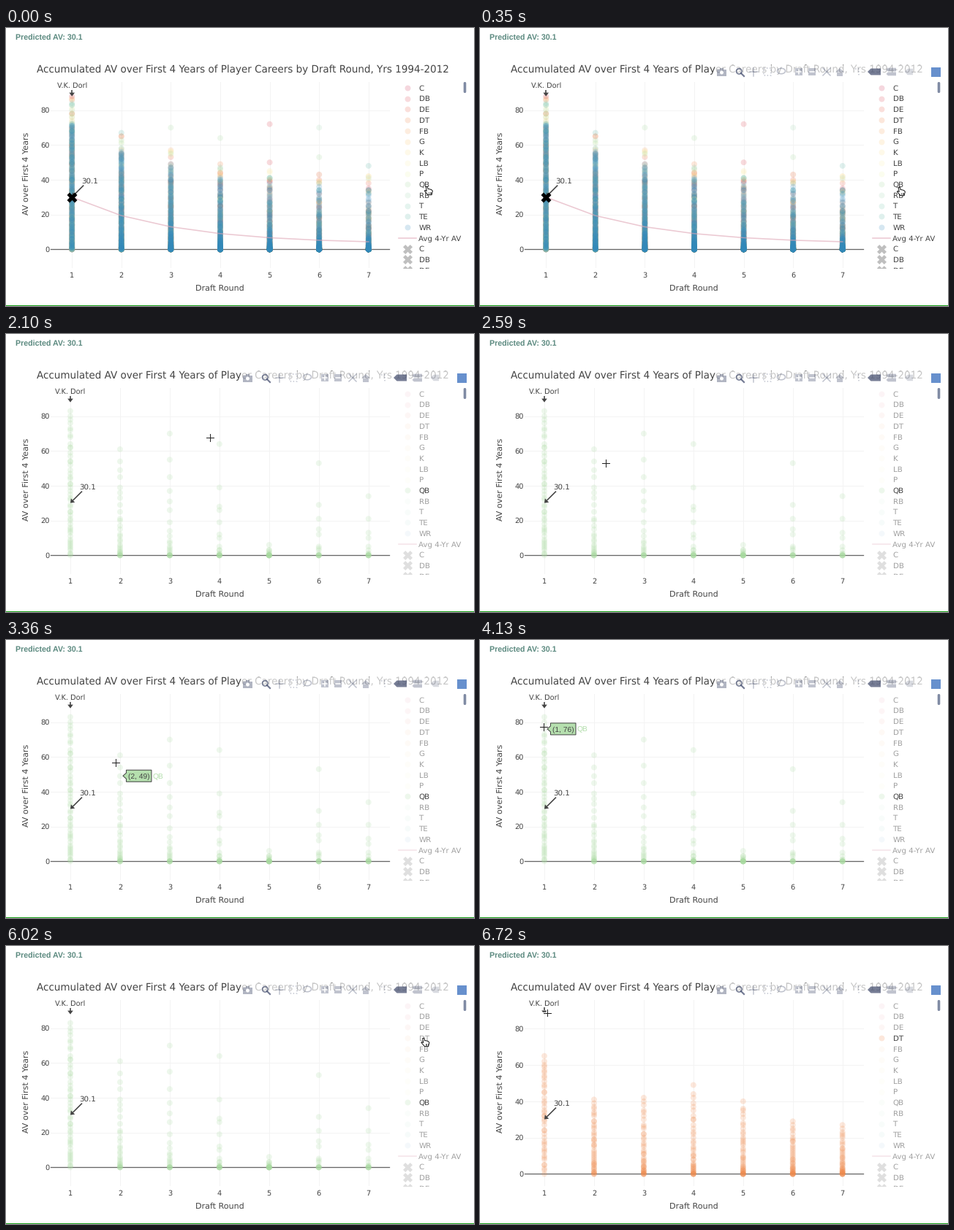
A matplotlib script that plays this animation: 640x381 px, repeating every 6790 ms.

```python
import numpy as np
import matplotlib.pyplot as plt
from matplotlib.animation import FuncAnimation
from matplotlib.colors import to_rgba
from matplotlib.patches import Ellipse, FancyBboxPatch, Polygon, Rectangle

W, H, DPI = 640, 381, 100
PX = 72 / DPI
FRAMES, STEP = 97, 70
INK, ROSE = "#444444", "#dfa5b5"
GAP = (np.nan, np.nan)

plt.rcParams["font.family"] = "DejaVu Sans"
plt.rcParams["text.hinting"] = "none"
plt.rcParams["toolbar"] = "None"

fig = plt.figure(figsize=(W / DPI, H / DPI), dpi=DPI, facecolor="white")
ax = fig.add_axes([0, 0, 1, 1])
ax.set_xlim(0, W)
ax.set_ylim(H, 0)
ax.axis("off")
ax.autoscale(False)


# ---------- drawing helpers (all sizes in pixels) ----------
def text(x, y, s, size=10.2, color=INK, ha="left", z=5, **kw):
    """Text whose capitals are centred on y."""
    return ax.text(x, y + 0.365 * size, s, fontsize=size * PX, color=color,
                   ha=ha, va="baseline", zorder=z, **kw)


def line(xs, ys, color=INK, lw=1.0, z=1, **kw):
    return ax.plot(xs, ys, color=color, lw=lw * PX, zorder=z, **kw)[0]


def poly(pts, color, z=5, lw=0, edge="none", **kw):
    return ax.add_patch(Polygon(pts, closed=True, fc=color, ec=edge,
                                lw=lw * PX, zorder=z, **kw))


def box(x, y, w, h, color, z=5):
    return ax.add_patch(Rectangle((x, y), w, h, fc=color, ec="none", zorder=z))


def dots(x, y, colors, d=7.9, marker="o", z=3):
    return ax.scatter(x, y, s=(d * PX) ** 2, c=colors, marker=marker,
                      linewidths=0, zorder=z)


def arrow(tip, dx, dy):
    tip, back = np.array(tip, float), np.array([dx, dy], float)
    u = back / np.hypot(dx, dy)
    n = np.array([-u[1], u[0]])
    base = tip + 5 * u
    return [line(*zip(tip + back, base), lw=1.6, z=5, solid_capstyle="butt"),
            poly([tip, base + 3.8 * n, base - 3.8 * n], INK)]


# ---------- data ----------
POSITIONS = {
    "C": "#d0385a", "DB": "#dc4a55", "DE": "#e85f4c", "DT": "#f08a4b",
    "FB": "#f8a860", "G": "#fdc877", "K": "#fee294", "LB": "#fbf3b0",
    "P": "#eef5b0", "QB": "#a9dba0", "RB": "#a8d8b5", "T": "#7fcab0",
    "TE": "#5fb5a8", "WR": "#3288bd",
}
ALPHA = 0.2
ROUNDS = np.arange(1, 8)
AVERAGE = 3 + 27 * np.exp(-0.5 * (ROUNDS - 1))
TOPS = 36 + 44 * np.exp(-0.5 * (ROUNDS - 1))
BEST = {"QB": [83, 61, 70, 64, 6, 53, 34], "DT": [65, 41, 42, 49, 40, 29, 27]}
STARS = [(1, 88, "C"), (5, 72, "DB"), (5, 50, "DB"), (6, 70, "RB"), (7, 48, "TE")]

rng = np.random.default_rng(11)


def spread(top, n, skew):
    """n scores up to top, crowding towards zero as skew grows."""
    u = (np.arange(n) + rng.random(n)) / n
    u[-1] = 1
    return np.round(top * u ** skew)


def scores(pos, r):
    if pos == "QB":
        return spread(BEST[pos][r - 1], 10 + 40 // r, 1.3 * min(r, 4))
    if pos == "DT":
        return spread(BEST[pos][r - 1], 42, min(0.6 + 0.5 * r, 2.3))
    top, mean = TOPS[r - 1], AVERAGE[r - 1]
    if pos == "WR":
        return spread(0.9 * top, 130, 0.7 * (top / mean - 1))
    return spread(top * rng.uniform(0.8, 1.1), 20, top / mean - 1)


players = [(r, v, pos) for pos in POSITIONS for r in ROUNDS for v in scores(pos, r)]
players += STARS


# ---------- one complete chart per legend selection ----------
def chart(only, x1, dx, y0, unit):
    X = lambda r: x1 + dx * (np.asarray(r, float) - 1)
    Y = lambda v: y0 - unit * np.asarray(v, float)
    out = []
    for r in ROUNDS:
        out += [line([X(r)] * 2, [74, 328], "#f3f3f3"),
                text(X(r), 338, str(r), 9.8, ha="center")]
    for v in range(0, 81, 20):
        out += [line([61, 524], [Y(v)] * 2, "#f3f3f3" if v else "#666666",
                     1 if v else 1.3, 1 if v else 2),
                text(59.5, Y(v), str(v), 9.8, ha="right")]

    shown = [p for p in players
             if not only or (p[2] == only and p not in STARS)]
    out.append(dots(X([p[0] for p in shown]), Y([p[1] for p in shown]),
                    [to_rgba(POSITIONS[p[2]], ALPHA) for p in shown]))

    x, guess, best = X(1), Y(30.1), Y(88)
    out += arrow((x, guess), 16, -16) + arrow((x, best), 0, -9)
    out += [text(x + 24, guess - 22, "30.1", ha="center"),
            text(x, best - 15, "V.K. Dorl", 9.8, ha="center")]
    if not only:
        out += [line(X(ROUNDS), Y(AVERAGE), ROSE, 1.6, 4, alpha=0.6),
                dots([x], [guess], ["black"], 14, "X", 6)]

    # legend
    for i, name in enumerate([*POSITIONS, "Avg 4-Yr AV", "C", "DB", "DE"]):
        y = 82 + 14.7 * i
        on = not only or (name == only and i < 14)
        fade = 1 if on else 0.5
        out.append(text(564.5, y, name, alpha=fade))
        if i < 14:
            tint = to_rgba(POSITIONS[name], ALPHA * fade ** 2)
            out.append(dots([549], [y], [tint], z=5))
        elif i == 14:
            out.append(line([537, 561], [y, y], ROSE, 1.6, 5, alpha=0.6 * fade))
        else:
            out.append(dots([549], [y], [to_rgba("black", 0.25 * fade)], 13, "X", 5))
    return out


charts = [chart(None, 90.2, 67.6, 303.3, 2.383),
          chart("QB", 88, 67.95, 303.3, 2.383),
          chart("DT", 88, 67.95, 312.4, 2.488)]

# ---------- fixed parts ----------
box(532, 330.3, 100, 16, "white", 6)
text(13, 13, "Predicted AV: 30.1", 10.6, "#5c8a80", family="Liberation Sans",
     weight="bold")
text(324.3, 56.5, "Accumulated AV over First 4 Years of Player Careers by "
     "Draft Round, Yrs 1994-2012", 13.5, ha="center")
text(292, 355.5, "Draft Round", 11.1, ha="center")
ax.text(31, 199.3, "AV over First 4 Years", fontsize=11.1 * PX, color=INK,
        rotation=90, rotation_mode="anchor", ha="center", va="baseline", zorder=5)
ax.add_patch(FancyBboxPatch((627.2, 75.5), 0.6, 12,
                            boxstyle="round,pad=0,rounding_size=0.3",
                            fc="#808ba4", ec="#808ba4", lw=3 * PX, zorder=6))
box(0, 380, W, 1, "#18a018")


# ---------- toolbar ----------
def toolbar():
    """Icons as (artist, opacity) pairs."""
    tint, y, z = "#3c4668", 60, 9
    out = [(box(322, 51, 312, 18, "white", 8), 0.7)]

    def add(artist, a=0.32):
        out.append((artist, a))

    def ring(x, yy, w, h, a=0.32):
        add(ax.add_patch(Ellipse((x, yy), w, h, fc="none", ec=tint,
                                 lw=1.6 * PX, zorder=z)), a)

    def stroke(xs, ys, a=0.32, lw=1.5, color=tint, **kw):
        add(line(xs, ys, color, lw, z + (color == "white"), **kw), a)

    def tag(x, yy, w, h, a=0.32):
        add(poly([(x, yy), (x + h / 2, yy - h / 2), (x + w, yy - h / 2),
                  (x + w, yy + h / 2), (x + h / 2, yy + h / 2)], tint, z), a)

    # camera and magnifier
    add(box(324, 57, 13, 8.5, tint, z), 0.4)
    add(box(328, 55, 5, 2, tint, z), 0.4)
    add(ax.add_patch(Ellipse((330.5, 61), 5, 5, fc="white", ec="none", zorder=z + 1)), 1)
    ring(354.3, 59.3, 7.5, 7.5, 0.7)
    stroke([357, 361], [62, 66], 0.7, 2.2)
    # move, box select, lasso
    stroke([368.5, 379.5], [y, y])
    stroke([374, 374], [y - 5.5, y + 5.5])
    stroke([388, 398, 398, 388, 388], [55, 55, 65, 65, 55], ls=":")
    ring(412, 59, 11, 7.5)
    # zoom in and out
    for x in (436, 454):
        add(box(x - 5.2, y - 5.2, 10.4, 10.4, tint, z))
        stroke([x - 3, x + 3], [y, y], 1, 1.6, "white")
    stroke([436, 436], [y - 3, y + 3], 1, 1.6, "white")
    # fit, home, guide lines
    for s in (-5, 5):
        stroke([469, 479], [y + s, y - s])
    add(poly([(486, 60.5), (492, 55), (498, 60.5)], tint, z))
    add(box(488, 60.5, 8, 5, tint, z))
    stroke([513, 518, 518], [55.5, 55.5, 66], ls=":")
    # hover tags
    tag(530, y, 18, 9, 0.7)
    tag(555.5, y - 2.9, 13.5, 4.8)
    tag(555.5, y + 2.9, 13.5, 4.8)
    tag(580.5, y, 11.5, 8.5, 0.2)
    add(box(616.5, 54, 13, 13, "#5f8acb", z), 0.95)
    return out


bar = toolbar()

# ---------- hover label ----------
MINT = "#b5dfae"
tip_box = poly(np.zeros((7, 2)), MINT, 10, 1, INK)
tip_text = text(0, 0, "", 10.2, z=11, family="Liberation Sans")
tip_name = text(0, 0, "QB", 10.2, MINT, z=11, family="Liberation Sans")
TIPS = [(38, 49, 2, 49), (49, 54, 2, 61), (58, 67, 1, 76)]


def show_tip(i):
    hit = [t[2:] for t in TIPS if t[0] <= i < t[1]]
    for a in (tip_box, tip_text, tip_name):
        a.set_visible(bool(hit))
    if not hit:
        return
    r, v = hit[0]
    x, y = 88 + 67.95 * (r - 1), 303 - 2.383 * v
    l, e = x + 8.5, x + 43
    tip_box.set_xy([(x + 4, y), (l, y - 4), (l, y - 8), (e, y - 8),
                    (e, y + 8), (l, y + 8), (l, y + 4)])
    tip_text.set_text(f"({r}, {v})")
    tip_text.set_position((x + 11, y + 3.7))
    tip_name.set_position((x + 45, y + 3.7))


# ---------- pointer ----------
HAND = 0.93 * np.array([(-0.8, 0.4), (1.4, 0.2), (2.2, 3.8), (5, 4.2), (7.4, 5),
                        (9, 6.8), (7.6, 12.6), (2.2, 12.6), (-2.8, 6.8),
                        (-2, 5.8), (0.2, 7)])
KNUCKLES = np.array([p for x in (3, 4.7, 6.4) for p in ((x, 7.5), (x, 10.3), GAP)])
CROSS = 4.8 * np.array([(-1, 0), (1, 0), GAP, (0, -1), (0, 1)])
# frame, x, y
PATH = np.array([(0, 575, 217), (3, 573, 218), (27, 573, 218), (30, 279, 142),
                 (38, 157, 182), (48, 150, 168), (52, 150, 164), (59, 87, 119),
                 (65, 87, 119), (76, 588.5, 151), (82, 570.5, 126),
                 (93, 570.5, 126), (96, 92, 91.5)])

hand = poly(HAND, "white", 12, 0.9, "black", joinstyle="round")
knuckles = line([], [], "black", 0.6, 13)
halo = line([], [], "white", 2.4, 12)
cross = line([], [], "#222222", 1, 13)


def move_pointer(i):
    p = np.array([np.interp(i, PATH[:, 0], PATH[:, c]) for c in (1, 2)])
    on_legend = p[0] > 535
    hand.set_xy(HAND + p)
    knuckles.set_data(*(KNUCKLES + p).T)
    for a in (halo, cross):
        a.set_data(*(CROSS + p).T)
        a.set_visible(not on_legend)
    for a in (hand, knuckles):
        a.set_visible(on_legend)


def update(i):
    state = 0 if i < 17 else 1 if i < 90 else 2
    for k, parts in enumerate(charts):
        for a in parts:
            a.set_visible(k == state)
    for a, opacity in bar:
        a.set_alpha(opacity * min(i / 5, 1))
    show_tip(i)
    move_pointer(i)
    return []


anim = FuncAnimation(fig, update, frames=FRAMES, interval=STEP, repeat=True,
                     repeat_delay=0, blit=False)
plt.show()
```
